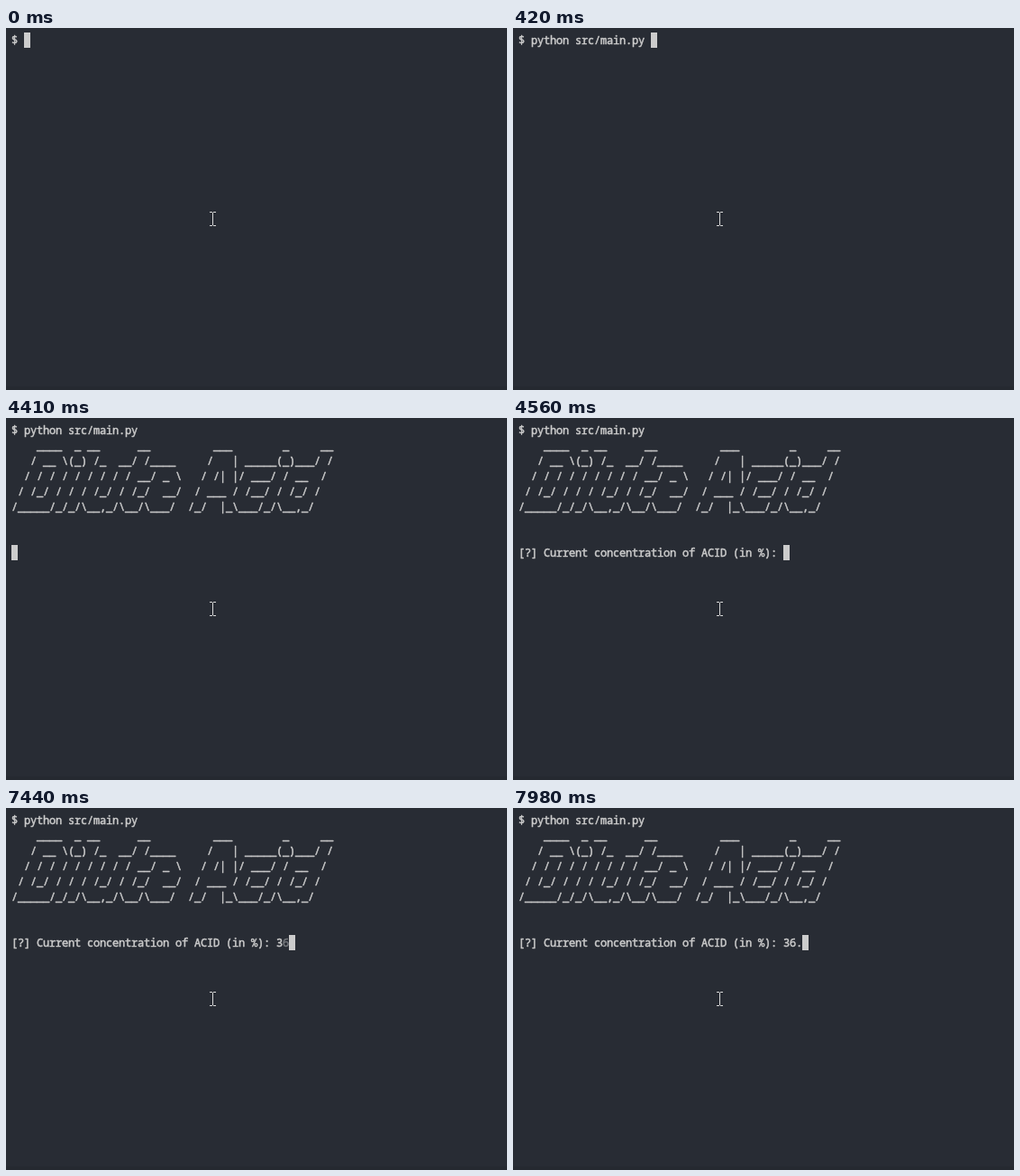
Animation, 556 px wide and 402 px high, one loop 8 s. Source, as an HTML page with a canvas:

```html
<!DOCTYPE html>
<html lang="en">
<head>
<meta charset="utf-8">
<title>Terminal</title>
<style>
  html, body { margin: 0; width: 100%; height: 100%; overflow: hidden; background: #282c34; }
  canvas { display: block; }
</style>
</head>
<body>
<canvas id="stage" width="556" height="402"></canvas>
<script>
const ctx = document.getElementById("stage").getContext("2d");
const LOOP = 8000;
const LEFT = 6, TOP = 5, CELL_W = 7, CELL_H = 17, BASELINE = 13;
const COLORS = { back: "#282c34", edge: "#252930", text: "#cccccc", dim: "#777a7e", cursor: "#cccccc" };

const command = "$ python src/main.py ";
const banner = String.raw`
    ____  _ __      __          ___        _     __
   / __ \(_) /_  __/ /____     /   | _____(_)___/ /
  / / / / / / / / / __/ _ \   / /| |/ ___/ / __  /
 / /_/ / / / /_/ / /_/  __/  / ___ / /__/ / /_/ /
/_____/_/_/\__,_/\__/\___/  /_/  |_\___/_/\__,_/`.split("\n").slice(1);
const screen = [command, ...banner, "", ""];
const question = "[?] Current concentration of ACID (in %): ";

// Each state: start time, lines on screen, count of freshly typed dim characters.
// The cursor follows the last character of the last line.
const states = [
  [0, ["$ "], 0],
  [20, [command.slice(0, 16)], 14],
  [60, [command.slice(0, 16)], 0],
  [420, [command], 0],
  [1450, [command, ""], 0],
  [4410, [...screen, ""], 0],
  [4560, [...screen, question], 0],
  [5920, [...screen, question + "3"], 0],
  [7440, [...screen, question + "36"], 1],
  [7540, [...screen, question + "36"], 0],
  [7960, [...screen, question + "36."], 1],
  [7980, [...screen, question + "36."], 0],
];

function fill(color, x, y, w, h) {
  ctx.fillStyle = color;
  ctx.fillRect(x, y, w, h);
}

// A thin outline gives the glyphs their medium weight.
function drawLine(text, row, dimFrom) {
  const y = TOP + row * CELL_H + BASELINE;
  [...text].forEach((char, col) => {
    const x = LEFT + col * CELL_W;
    ctx.fillStyle = ctx.strokeStyle = col < dimFrom ? COLORS.text : COLORS.dim;
    ctx.fillText(char, x, y);
    ctx.strokeText(char, x, y);
  });
}

function drawPointer() {
  fill("#d8d8d8", 229, 205, 1, 14);
  for (const y of [204, 219]) {
    fill("#d8d8d8", 226, y, 3, 1);
    fill("#d8d8d8", 230, y, 3, 1);
  }
}

function draw(time) {
  const [, lines, dimCount] = states.findLast(([start]) => start <= time);
  const lastRow = lines.length - 1;
  const cursorCol = lines[lastRow].length;

  fill(COLORS.back, 0, 0, 556, 402);
  fill(COLORS.edge, 0, 398, 556, 4);
  ctx.font = '12px "Noto Sans Mono", monospace';
  ctx.lineWidth = 0.5;
  ctx.lineJoin = "round";
  lines.forEach((text, row) =>
    drawLine(text, row, row === lastRow ? cursorCol - dimCount : Infinity));
  fill(COLORS.cursor, LEFT + cursorCol * CELL_W, TOP + lastRow * CELL_H, CELL_W, CELL_H);
  drawPointer();
}

const begin = performance.now();
function tick() {
  draw((performance.now() - begin) % LOOP);
  requestAnimationFrame(tick);
}
tick();
</script>
</body>
</html>
```
